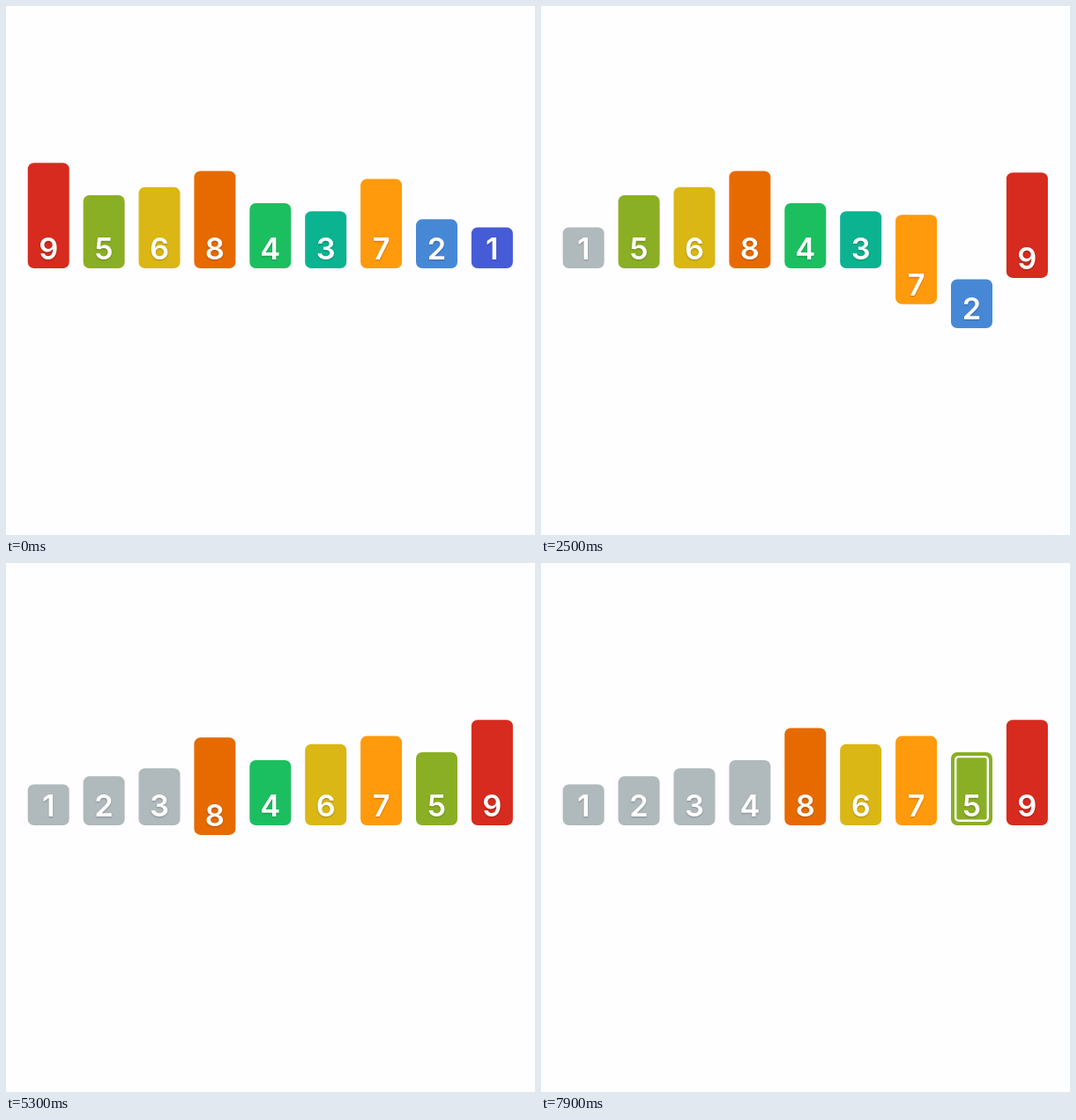
Write an HTML page with a canvas that moves like this. It is 600 by 601 pixels and loops after 8 s.

```html
<!DOCTYPE html>
<html lang="en">
<head>
<meta charset="utf-8">
<title>Selection sort</title>
<style>
html, body { margin: 0; width: 100%; height: 100%; overflow: hidden; background: #fefdff; }
canvas { display: block; }
</style>
</head>
<body>
<canvas id="stage" width="600" height="601"></canvas>
<script>
const ctx = document.getElementById('stage').getContext('2d');
const LOOP = 8000, STEP = 100;
const VALUES = [9, 5, 6, 8, 4, 3, 7, 2, 1];
const COLORS = ['#465cd6', '#4788d6', '#0bb391', '#1cbf60', '#8aaf24',
  '#dab715', '#ff9a0c', '#e66a00', '#d62b1e'];
const DONE = '#b0b9bc';
const STARTS = [55, 1781, 3760, 5281, 6982, 8750];
const STAGGER = 100, HALF = 145, DROP = 83;
const SWAP = 400, PAUSE = 50, LIFT = 31;
const LEFT = 24.7, PITCH = 62.9, WIDTH = 47, BASE = 298;

const clamp = v => Math.max(0, Math.min(1, v));
const ease = p => (1 - Math.cos(Math.PI * p)) / 2;

function box(x, y, w, h, r) {
  ctx.beginPath();
  ctx.roundRect(x, y, w, h, r);
}

function drawBar(value, slot, dy, done, marked) {
  const x = LEFT + PITCH * slot;
  const h = 46.5 + 9.15 * (value - 1);
  const bottom = BASE + dy;
  ctx.fillStyle = done ? DONE : COLORS[value - 1];
  box(x, bottom - h, WIDTH, h, 7);
  ctx.fill();
  if (marked) {
    ctx.strokeStyle = '#fff';
    ctx.lineWidth = 2.4;
    box(x + 5.2, bottom - h + 5.2, WIDTH - 10.4, h - 10.4, 3.5);
    ctx.stroke();
  }
  ctx.shadowColor = 'rgba(0,0,0,.25)';
  ctx.shadowBlur = 2;
  ctx.shadowOffsetY = 1;
  ctx.fillStyle = '#fff';
  ctx.fillText(value, x + WIDTH / 2, bottom - 10);
  ctx.shadowColor = 'transparent';
}

function draw(t) {
  ctx.fillStyle = '#fefdff';
  ctx.fillRect(0, 0, 600, 601);
  ctx.font = '600 34.5px Inter, sans-serif';
  ctx.textAlign = 'center';

  // Replay the finished passes, then pose the current one.
  const list = [...VALUES];
  let pass = 0;
  const smallest = () => list.indexOf(Math.min(...list.slice(pass)));
  while (t >= STARTS[pass + 1]) {
    const m = smallest();
    [list[pass], list[m]] = [list[m], list[pass]];
    pass++;
  }
  const min = smallest();
  const since = t - STARTS[pass];
  const waveEnd = (8 - pass) * STAGGER + 2 * HALF;
  const p = clamp((t - STARTS[pass + 1] + PAUSE + SWAP) / SWAP);
  const shift = (min - pass) * ease(p);
  const lift = LIFT * Math.sin(Math.PI * p);

  list.forEach((value, i) => {
    let slot = i, dy = 0;
    if (i >= pass) {
      dy = DROP * clamp(1 - Math.abs(since - (i - pass) * STAGGER - HALF) / HALF);
    }
    if (i === pass) { slot += shift; dy -= lift; }
    if (i === min) { slot -= shift; dy += lift; }
    const done = i < pass || (i === min && p === 1);
    drawBar(value, slot, dy, done, i === min && since >= waveEnd && !done);
  });
}

function tick(now) {
  draw(Math.floor(now % LOOP / STEP) * STEP);
  requestAnimationFrame(tick);
}
draw(0);
requestAnimationFrame(tick);
</script>
</body>
</html>
```
